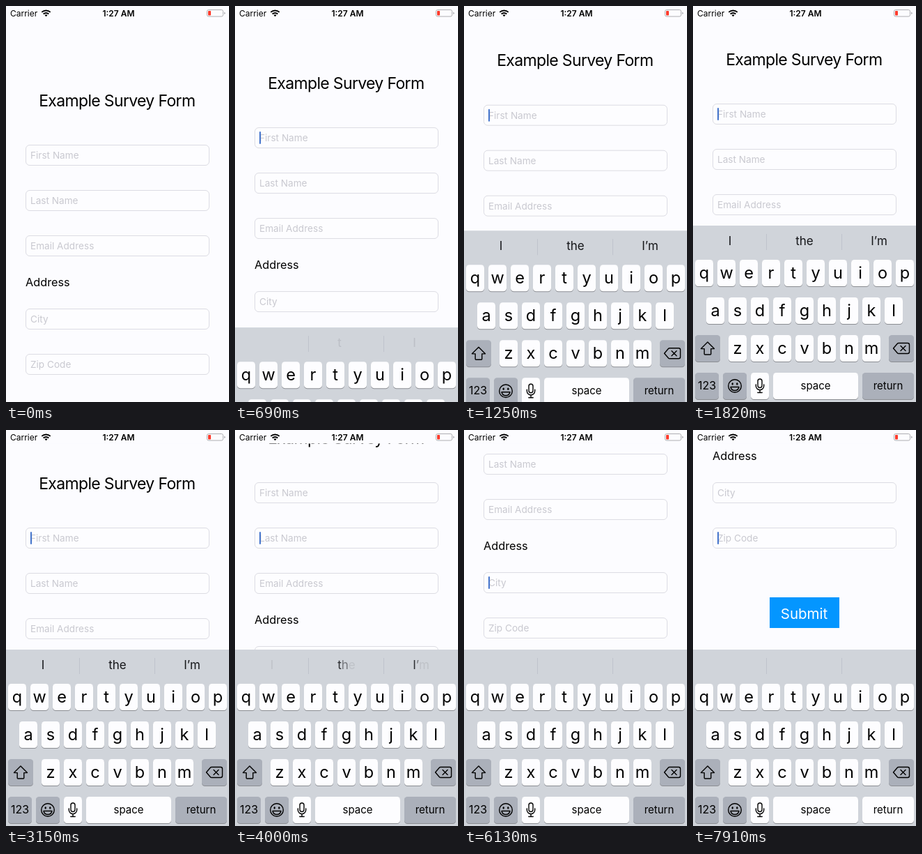
An HTML page for the animation above (8000 ms loop, 320 by 568 pixels).

```html
<!DOCTYPE html>
<html lang="en">
<head>
<meta charset="utf-8">
<title>Survey form</title>
<style>
  html, body { margin: 0; width: 100%; height: 100%; overflow: hidden; background: #fcfcff; }
  svg { display: block; width: 100%; height: 100%; }
  text { font-family: Inter, Roboto, "Liberation Sans", sans-serif; fill: #000; }
  .mid { text-anchor: middle; }
  .title { font-size: 23px; letter-spacing: -.66px; }
  .label { font-size: 16.3px; }
  .hint { font-size: 13.6px; fill: #c9c9d0; }
  .submit { font-size: 20.5px; fill: #fff; }
  .letter { font-size: 23.5px; }
  .word { font-size: 15px; }
  .digits { font-size: 16px; }
  .guess { font-size: 17px; fill: #16171a; }
  .status { font-size: 12px; }
  .bold { font-weight: 600; }
  .line { fill: none; stroke: #000; stroke-width: 1.4; stroke-linejoin: round; stroke-linecap: round; }
</style>
</head>
<body>
<svg id="stage" viewBox="0 0 320 568">
  <rect width="320" height="568" fill="#fcfcff"/>
  <g id="form"></g>
  <g id="status">
    <rect width="320" height="19.5" fill="#fcfcff"/>
    <text class="status" x="6" y="14.5">Carrier</text>
    <g fill="none" stroke="#000" stroke-width="2">
      <path d="M51.3 8.9a9 9 0 0 1 12.4 0M53.7 11.5a5.4 5.4 0 0 1 7.6 0"/>
      <path d="M57.5 15.2l-2-2.1a2.9 2.9 0 0 1 4 0z" fill="#000" stroke="none"/>
    </g>
    <text id="clock" class="status bold mid" x="161.5" y="14.5"></text>
    <rect x="288.5" y="5.5" width="23" height="9.5" rx="2.2" fill="none" stroke="#aeaeb2"/>
    <rect x="290" y="7" width="4" height="6.5" rx=".8" fill="#ff3b2c"/>
    <path d="M313 8.5v3.5q1.6-.5 1.6-1.75t-1.6-1.75z" fill="#aeaeb2"/>
  </g>
  <g id="keyboard"></g>
</svg>
<script>
const LOOP = 8000;
const BOARD_TOP = 315, BOARD_HEIGHT = 253;
const INK = '#000', KEY = '#fdfdff', DARK_KEY = '#abb0ba';

const form = document.getElementById('form');
const keyboard = document.getElementById('keyboard');
const clock = document.getElementById('clock');

function add(parent, tag, attrs, text) {
  const node = document.createElementNS('http://www.w3.org/2000/svg', tag);
  for (const name in attrs) node.setAttribute(name, attrs[name]);
  if (text) node.textContent = text;
  parent.appendChild(node);
  return node;
}

const clamp = v => Math.max(0, Math.min(1, v));
const ramp = (t, start, length) => clamp((t - start) / length);
const easeInOut = p => (1 - Math.cos(Math.PI * p)) / 2;
const easeOut = p => 1 - (1 - p) ** 2;

// Linear interpolation through [time, value] pairs.
function track(t, points) {
  let [t0, v0] = points[0];
  if (t < t0) return v0;
  for (const [t1, v1] of points) {
    if (t < t1) return v0 + (v1 - v0) * (t - t0) / (t1 - t0);
    [t0, v0] = [t1, v1];
  }
  return v0;
}

// Form
const fields = [['First Name', 199], ['Last Name', 264], ['Email Address', 329], ['City', 434], ['Zip Code', 499]];
add(form, 'text', { class: 'title mid', x: 159.3, y: 143.6 }, 'Example Survey Form');
add(form, 'text', { class: 'label', x: 28, y: 402 }, 'Address');
for (const [name, y] of fields) {
  add(form, 'rect', { x: 28.5, y: y + .5, width: 263, height: 29, rx: 5.5, fill: KEY, stroke: '#dcdce3' });
  add(form, 'text', { class: 'hint', x: 35, y: y + 20 }, name);
}
add(form, 'rect', { x: 110, y: 599, width: 100, height: 44, fill: '#0496ff' });
add(form, 'text', { class: 'submit mid', x: 159.5, y: 629.5 }, 'Submit');
const caret = add(form, 'rect', { x: 35, width: 2, height: 18, rx: 1, fill: '#4474cc' });

// Keyboard, drawn relative to its own top edge
function addKey(x, row, width, fill) {
  const y = 49 + row * 54;
  add(keyboard, 'rect', { x, y: y + 1, width, height: 38, rx: 4.5, fill: '#8b8d92' });
  return add(keyboard, 'rect', { x, y, width, height: 38, rx: 4.5, fill });
}

function addWordKey(x, width, fill, word, style = 'word') {
  const key = addKey(x, 3, width, fill);
  add(keyboard, 'text', { class: style + ' mid', x: x + width / 2, y: 235 }, word);
  return key;
}

const addLine = d => add(keyboard, 'path', { class: 'line', d });

add(keyboard, 'rect', { width: 320, height: BOARD_HEIGHT + 2, fill: '#d0d4da' });
for (const x of [105, 213]) add(keyboard, 'rect', { x, y: 12, width: 1, height: 23, fill: '#bfc3cc' });

const guesses = ['I', 'the', 'I’m'].map((word, i) => {
  const text = add(keyboard, 'text', { class: 'guess mid', x: 53 + i * 107, y: 28 });
  return [...word].map(ch => add(text, 'tspan', {}, ch));
});

[['qwertyuiop', 3], ['asdfghjkl', 19], ['zxcvbnm', 51]].forEach(([letters, left], row) => {
  [...letters].forEach((ch, i) => {
    const x = left + i * 32;
    addKey(x, row, 26, KEY);
    add(keyboard, 'text', { class: 'letter mid', x: x + 13, y: 75.6 + row * 54 }, ch);
  });
});

addKey(3, 2, 36, DARK_KEY);
addLine('M21 167l9.5 9.6h-4.7v7.4q0 1-1 1h-7.6q-1 0-1-1v-7.4h-4.7z');
addKey(281, 2, 36, DARK_KEY);
addLine('M295 168.5h13q2.5 0 2.5 2.5v10q0 2.5-2.5 2.5h-13q-1 0-1.7-.8l-5.8-6.7 5.8-6.7q.7-.8 1.7-.8zM298 172.5l7 7M305 172.5l-7 7');

addWordKey(3, 34, DARK_KEY, '123', 'digits');
addKey(43, 3, 34, DARK_KEY);
add(keyboard, 'circle', { class: 'line', cx: 60, cy: 230, r: 9.3 });
for (const cx of [56.7, 63.3]) add(keyboard, 'ellipse', { cx, cy: 227, rx: 1.2, ry: 1.7, fill: INK });
addLine('M54 231.5h12q-1 5-6 5t-6-5z');
addKey(83, 3, 26, KEY);
add(keyboard, 'rect', { class: 'line', x: 93, y: 220, width: 6, height: 12.5, rx: 3 });
addLine('M90.3 228v2a5.7 5.7 0 0 0 11.4 0v-2M96 236v3.5M92.8 239.5h6.4');
addWordKey(115, 122, KEY, 'space');
const returnKey = addWordKey(243, 74, DARK_KEY, 'return');

// Motion
const pauses = [[970, 1070], [1250, 1350], [4000, 4100]];
const focusTimes = [500, 3720, 5110, 6110, 7140];
const presses = [[3530, 3720], [4940, 5110], [5930, 6110], [6930, 7130], [7905, LOOP]];
const blink = [
  [1350, 1], [1580, 0], [1700, 0], [1820, 1], [2240, 1], [2470, 0], [2680, 0], [2820, 1],
  [3150, 1], [3380, 0], [3720, 0], [3720, 1], [4580, 1], [4810, 0], [5110, 0], [5110, 1]
];

// Critically damped spring from 0 to 1, set off by the first focus.
function rise(t) {
  const x = Math.max(0, t - 488) * .0071;
  const left = (1 + x) * Math.exp(-x);
  return t < 500 ? 0 : left < .002 ? 1 : 1 - left;
}

// A scroll that starts, stalls, and finishes half a second later.
const stalledScroll = (t, start) =>
  .39 * ramp(t, start - 10, 28) + .61 * easeOut(ramp(t, start + 480, 290));

function scrollOffset(t) {
  return 59 * rise(t)
    + 65 * easeInOut(ramp(t, 3720, 270))
    + 65 * stalledScroll(t, 5110)
    + 105 * stalledScroll(t, 6110)
    + 65 * stalledScroll(t, 7140);
}

// Guess letters come and go one by one; the last letter leads out and trails in.
function letterAlpha(t, fromEnd) {
  return ramp(t, 835 - fromEnd * 80, 150) * (1 - ramp(t, 3850 + fromEnd * 65, 165));
}

function draw(now) {
  const pause = pauses.find(([a, b]) => now >= a && now < b);
  const t = pause ? pause[0] : now;

  form.setAttribute('transform', `translate(0 ${-scrollOffset(t)})`);
  const top = BOARD_TOP + BOARD_HEIGHT * (1 - rise(t));
  keyboard.setAttribute('transform', `translate(0 ${top})`);
  keyboard.setAttribute('visibility', t < 500 ? 'hidden' : 'visible');

  const focus = focusTimes.filter(start => t >= start).length - 1;
  caret.setAttribute('y', fields[Math.max(0, focus)][1] + 6);
  caret.setAttribute('opacity', focus < 0 ? 0 : track(t, blink));

  for (const letters of guesses) {
    letters.forEach((node, i) => node.setAttribute('fill-opacity', letterAlpha(t, letters.length - 1 - i)));
  }

  const pressed = presses.some(([a, b]) => t >= a && t < b);
  returnKey.setAttribute('fill', pressed ? KEY : DARK_KEY);
  clock.textContent = t < 6930 ? '1:27 AM' : '1:28 AM';
}

const begin = performance.now();
function tick() {
  draw((performance.now() - begin) % LOOP);
  requestAnimationFrame(tick);
}
tick();
</script>
</body>
</html>
```
